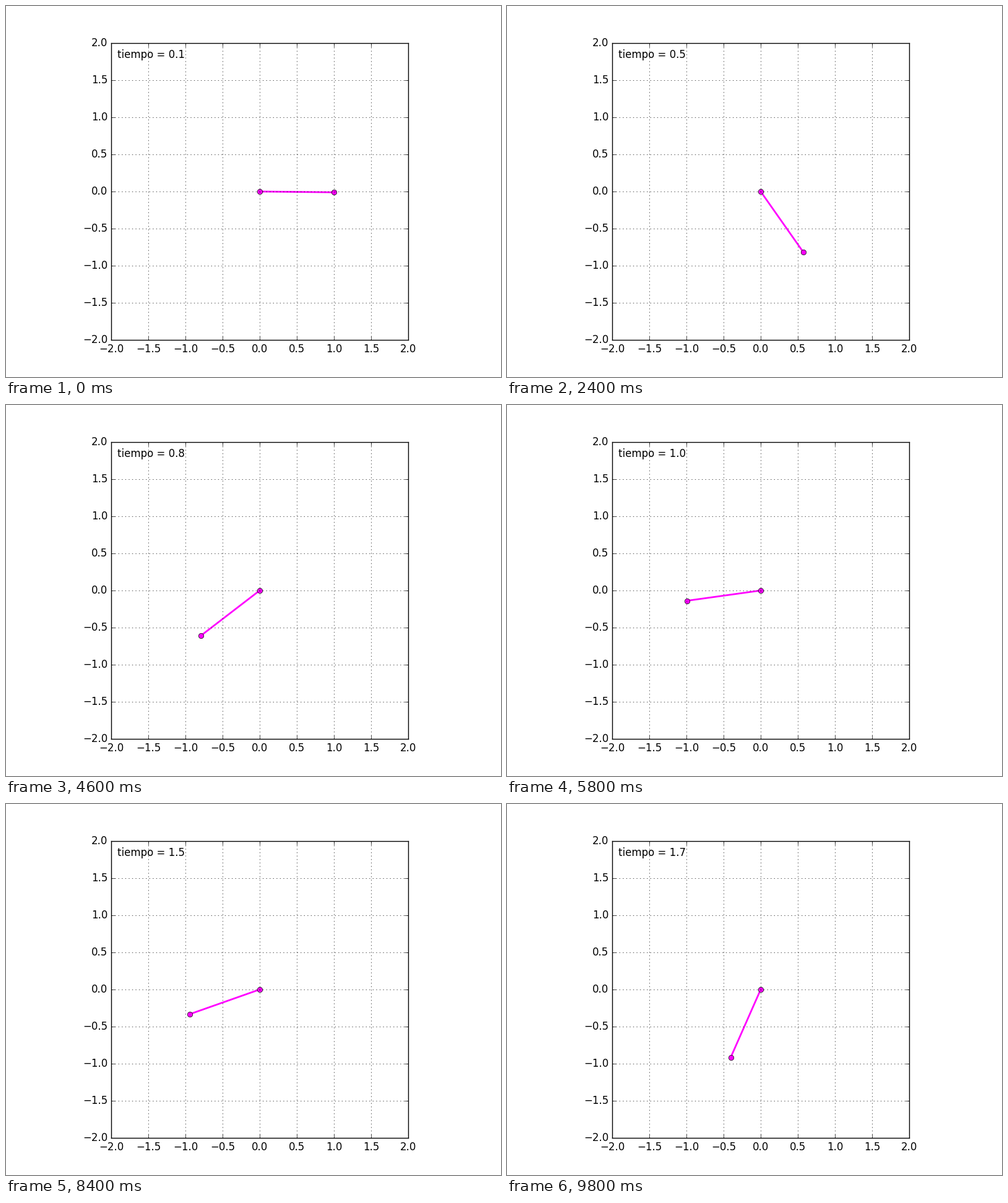
Write a matplotlib script that moves like this. It is 800 by 600 pixels and loops after 10000 ms.

```python
import math

import matplotlib.pyplot as plt
import numpy as np
from matplotlib.animation import FuncAnimation

FRAMES = 50
INTERVAL = 200
DT = 0.0333
GRAVITY = 9.8
LENGTH = 1.0
WARMUP = 2  # steps already taken when the first frame shows


def swing(steps):
    """Pendulum angles after 0..steps steps, released from the horizontal."""
    theta, omega = math.pi / 2, 0.0
    angles = [theta]
    for _ in range(steps):
        theta += omega * DT
        omega -= GRAVITY / LENGTH * math.sin(theta) * DT
        angles.append(theta)
    return angles


plt.style.use("classic")
plt.rcParams.update({
    "font.family": "DejaVu Sans",
    "figure.facecolor": "white",
    "savefig.facecolor": "white",
    "savefig.dpi": 100,
})

fig = plt.figure(figsize=(8, 6), dpi=100)
ax = fig.add_subplot(111, aspect="equal", xlim=(-2, 2), ylim=(-2, 2))
ticks = np.arange(-2, 2.1, 0.5)
ax.set_xticks(ticks)
ax.set_yticks(ticks)
ax.grid(True)

rod, = ax.plot([], [], "o-", color="magenta", lw=2)
label = ax.text(0.02, 0.95, "", transform=ax.transAxes)
angles = swing(FRAMES + WARMUP)


def draw(i):
    step = i + WARMUP
    theta = angles[step]
    rod.set_data([0, LENGTH * math.sin(theta)], [0, -LENGTH * math.cos(theta)])
    label.set_text(f"tiempo = {step * DT:.1f}")
    return rod, label


anim = FuncAnimation(fig, draw, frames=FRAMES, interval=INTERVAL, repeat=True)
plt.show()
```
